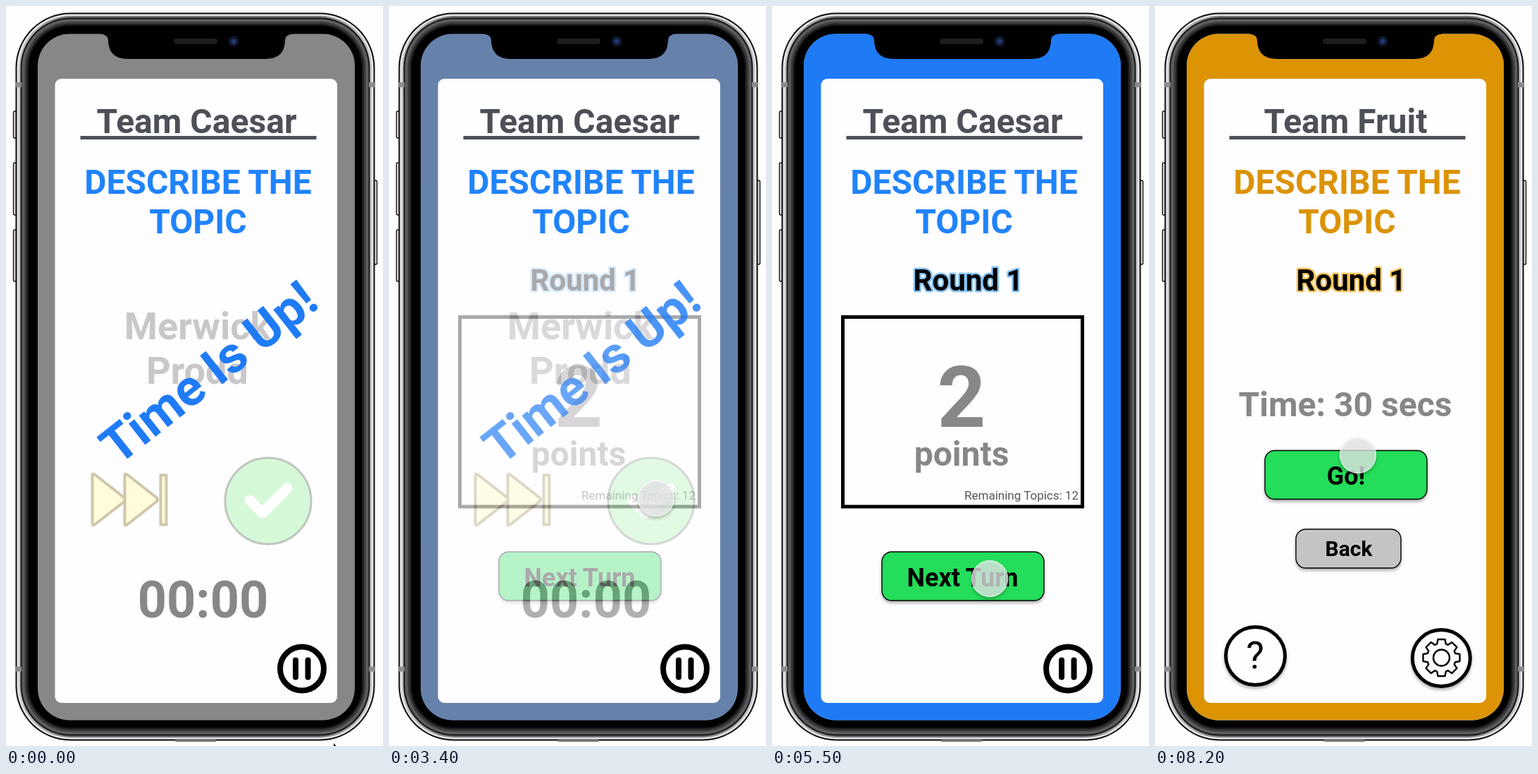
Recreate the animation shown at these times as an HTML page. Size 535 by 1048 pixels, loop 8.3 s.

```html
<!DOCTYPE html>
<html lang="en">
<head>
<meta charset="utf-8">
<title>Party game turn</title>
<style>
html, body { margin: 0; width: 100%; height: 100%; overflow: hidden; background: #fefefe; }
svg { display: block; width: 100vw; height: 100vh; }
text { font-family: Roboto, sans-serif; font-weight: 700; text-anchor: middle; white-space: pre; }
.shadow { filter: drop-shadow(0 3px 2px rgba(0, 0, 0, .3)); }
</style>
</head>
<body>
<svg id="stage" viewBox="0 0 535 1048" preserveAspectRatio="none"></svg>
<script>
const LOOP = 8300, STEP = 100, SCREEN_W = 449;
const INK = '#4d5056', GREY = '#898687', WHITE = '#fefdff';
const BLUE = '#1f7bf5', ORANGE = '#dc9304';

const rect = (x, y, w, h, r, fill, extra = '') =>
  `<rect x="${x}" y="${y}" width="${w}" height="${h}" rx="${r}" fill="${fill}" ${extra}/>`;
const label = (s, x, y, size, fill, extra = '') =>
  `<text x="${x}" y="${y}" font-size="${size}" fill="${fill}" ${extra}>${s}</text>`;
const ring = (inset, fill) =>
  rect(13.5 + inset, 9.5 + inset, 510 - 2 * inset, 1031 - 2 * inset, 78 - inset, fill);
const button = (x, y, w, h, fill, s, tx, ty, size) =>
  rect(x, y, w, h, 14, fill, 'stroke="#000" stroke-width="1.4" class="shadow"') +
  label(s, tx, ty, size, '#000');

function card(bg, accent, title, body) {
  return rect(45, 39, 450, 973, 0, bg) + rect(69.5, 103, 400.5, 884, 9, WHITE) +
    label(title, 270.5, 180, 48, INK) + rect(105.5, 184, 335, 5, 0, INK) +
    label('DESCRIBE THE', 272.5, 266, 48, accent) +
    label('TOPIC', 272.5, 322, 48, accent) + body;
}

const roundLabel = halo => label('Round 1', 278.5, 403, 42, '#000',
  `stroke="${halo}" stroke-width="5" stroke-linejoin="round" paint-order="stroke"`);

const pause = `<circle cx="420" cy="938.5" r="31" fill="${WHITE}" stroke="#000" stroke-width="8"/>` +
  rect(407, 922.5, 8, 32, 4, '#000') + rect(424.5, 922.5, 8, 32, 4, '#000');

const triangle = x => `<path d="M${x} 665v68q0 4 4 1l41-32q3-3 0-6l-41-32q-4-3-4 1z"/>`;

const timeUpCard = card(GREY, '#2083fb', 'Team Caesar',
  label('Merwick', 271.5, 472, 54, '#c9c7c9') + label('Prodd', 271.5, 535, 54, '#c9c7c9') +
  `<g fill="#fffbdb" stroke="#cec7ab" stroke-width="4" stroke-linejoin="round">
    ${triangle(122.5)}${triangle(168.5)}<path d="M219.5 664.5h8v70h-8z" stroke-linejoin="miter"/></g>
  <circle cx="372" cy="701" r="61" fill="#d5f9d8" stroke="#bfc6bf" stroke-width="3"/>
  <path d="M346 700l18 18 35-35" fill="none" stroke="#fff" stroke-width="15"
    stroke-linecap="round" stroke-linejoin="round"/>` +
  label('00:00', 279.5, 866, 72, GREY) + pause);

const scoreCard = card(BLUE, '#2083fb', 'Team Caesar',
  roundLabel('#86c4f6') +
  rect(100.5, 440.5, 340, 268.5, 0, 'none', 'stroke="#000" stroke-width="5"') +
  label('2', 269, 596, 120, GREY) + label('points', 269, 651, 48, GREY) +
  label('Remaining Topics: 12', 354, 699, 17, '#55565a', 'style="font-weight:400"') +
  button(156, 773, 230, 69, '#24dd5a', 'Next Turn', 270.5, 822, 36) + pause);

function gear(cx, cy, teeth) {
  const pts = [];
  for (let i = 0; i < teeth; i++) {
    [[-.31, 20.5], [-.19, 26.5], [.19, 26.5], [.31, 20.5]].forEach(([da, r]) => {
      const a = i * 2 * Math.PI / teeth + da;
      pts.push((cx + r * Math.sin(a)).toFixed(1) + ',' + (cy - r * Math.cos(a)).toFixed(1));
    });
  }
  return `<g fill="none" stroke="#000" stroke-width="2.4" stroke-linejoin="round">
    <polygon points="${pts.join(' ')}"/><circle cx="${cx}" cy="${cy}" r="11.5"/></g>`;
}

const disc = (cx, cy, rx, ry) =>
  `<ellipse cx="${cx}" cy="${cy}" rx="${rx}" ry="${ry}" fill="${WHITE}" stroke="#000" stroke-width="5" class="shadow"/>`;

const nextCard = card(ORANGE, ORANGE, 'Team Fruit',
  roundLabel('#f6c65c') + label('Time: 30 secs', 270, 581, 48, GREY) +
  button(156, 629.5, 230, 69, '#24dd5a', 'Go!', 271, 678, 36) +
  button(200, 741, 149, 55, '#c5c3c5', 'Back', 275, 779, 30) +
  disc(142.5, 920.5, 42, 41) + label('?', 142, 938, 54, '#000', 'style="font-weight:400"') +
  disc(406.3, 923.5, 41, 40) + gear(406.5, 923, 8));

const sideKey = (x, y, h) =>
  rect(x, y, 5, h, 2, '#d5d5d7', 'stroke="#111" stroke-width="1.3"');
const bands = [108, 935.5].map(y => rect(14, y, 8, 7, 0, '#8b8b8b') + rect(515, y, 8, 7, 0, '#8b8b8b')).join('');

const stage = document.getElementById('stage');
stage.innerHTML = `
<defs>
  <clipPath id="glass">${rect(45, 39.5, 450, 972, 45, '#000')}</clipPath>
  <linearGradient id="steel" x1="0" x2="1" y1="0" y2="0">
    <stop offset="0" stop-color="#c9c9cb"/><stop offset=".15" stop-color="#77777a"/>
    <stop offset=".85" stop-color="#77777a"/><stop offset="1" stop-color="#c9c9cb"/>
  </linearGradient>
  <linearGradient id="fade">
    <stop id="fadeA" offset=".45" stop-color="${BLUE}"/><stop id="fadeB" offset=".85" stop-color="${BLUE}"/>
  </linearGradient>
</defs>
${sideKey(10.5, 149, 38)}${sideKey(10.5, 222, 74)}${sideKey(10.5, 317, 73)}${sideKey(521.5, 247, 119)}
${ring(0, '#0b0b0b')}${ring(2, '#e6e6e8')}${ring(4.5, 'url(#steel)')}${ring(7, '#161616')}
${ring(9, '#5c5c5e')}${ring(13, '#3a3a3c')}${ring(16, '#1a1a1b')}${ring(18.5, '#000')}${bands}
${rect(240, 1039, 58, 3, 1, '#777')}
<g clip-path="url(#glass)">
  <g id="first">${timeUpCard}</g>
  <g id="score">${scoreCard}</g>
  <text id="up" transform="translate(303 538.5) rotate(-38.2)" font-size="72" fill="url(#fade)">Time Is Up!</text>
  <g id="next">${nextCard}</g>
</g>
<path d="M134 37v2.5q11 1 11 10v0q1 25.500 28 25.500H368q27 0 28-25.500v0q0-9 11-10v-2.500z" fill="#000"/>
${rect(238, 46, 62, 8, 4, '#1d1d1e')}
<circle cx="323" cy="50" r="7.500" fill="#11162b"/><circle cx="323" cy="50" r="3.500" fill="#22386f"/>
<circle id="touch" r="25.500" fill="rgba(241,241,244,.74)" stroke="rgba(255,255,255,.65)" stroke-width="1.500" class="shadow"/>
<path id="arrow" d="M465 1044v14l9-4z" fill="#000"/>`;

const el = {};
['score', 'up', 'next', 'touch', 'arrow', 'fadeA', 'fadeB'].forEach(id => el[id] = document.getElementById(id));

const clamp = v => Math.min(1, Math.max(0, v));

// cubic-bezier(0, 0, .58, 1)
function easeOut(x) {
  let lo = 0, hi = 1;
  for (let i = 0; i < 24; i++) {
    const u = (lo + hi) / 2;
    if (1.74 * u * u * (1 - u) + u * u * u < x) lo = u; else hi = u;
  }
  return lo * lo * (3 - 2 * lo);
}
const phase = (t, start, length) => easeOut(clamp((t - start) / length));

// time, x, y
const path = [[400, 412, 925], [1000, 379, 696], [3300, 379, 697], [4300, 379, 697],
  [5200, 309, 811], [5700, 309, 811], [6100, 309, 814], [7100, 309, 814], [8000, 288, 636]];

function touchAt(t) {
  let i = 0;
  while (i < path.length - 2 && t > path[i + 1][0]) i++;
  const [t0, x0, y0] = path[i], [t1, x1, y1] = path[i + 1];
  const k = clamp((t - t0) / (t1 - t0)), s = k * k * (3 - 2 * k);
  return [x0 + (x1 - x0) * s, y0 + (y1 - y0) * s];
}

function draw(t) {
  const mix = phase(t, 3120, 1300), slide = phase(t, 5970, 1250);
  el.score.setAttribute('opacity', mix);
  el.fadeA.setAttribute('stop-opacity', 1 - mix);
  el.fadeB.setAttribute('stop-opacity', Math.sqrt(1 - mix));
  el.up.style.display = mix > .999 ? 'none' : '';
  el.next.style.display = slide > 0 ? '' : 'none';
  el.next.setAttribute('transform', `translate(${(SCREEN_W * (1 - slide)).toFixed(2)} 0)`);
  el.arrow.style.display = t < 100 ? '' : 'none';
  el.touch.style.display = t < 400 ? 'none' : '';
  el.touch.setAttribute('transform', `translate(${touchAt(t).join(' ')})`);
}

const begin = performance.now();
function tick() {
  const t = (performance.now() - begin) % LOOP;
  draw(Math.floor(t / STEP) * STEP);
  requestAnimationFrame(tick);
}
tick();
</script>
</body>
</html>
```
